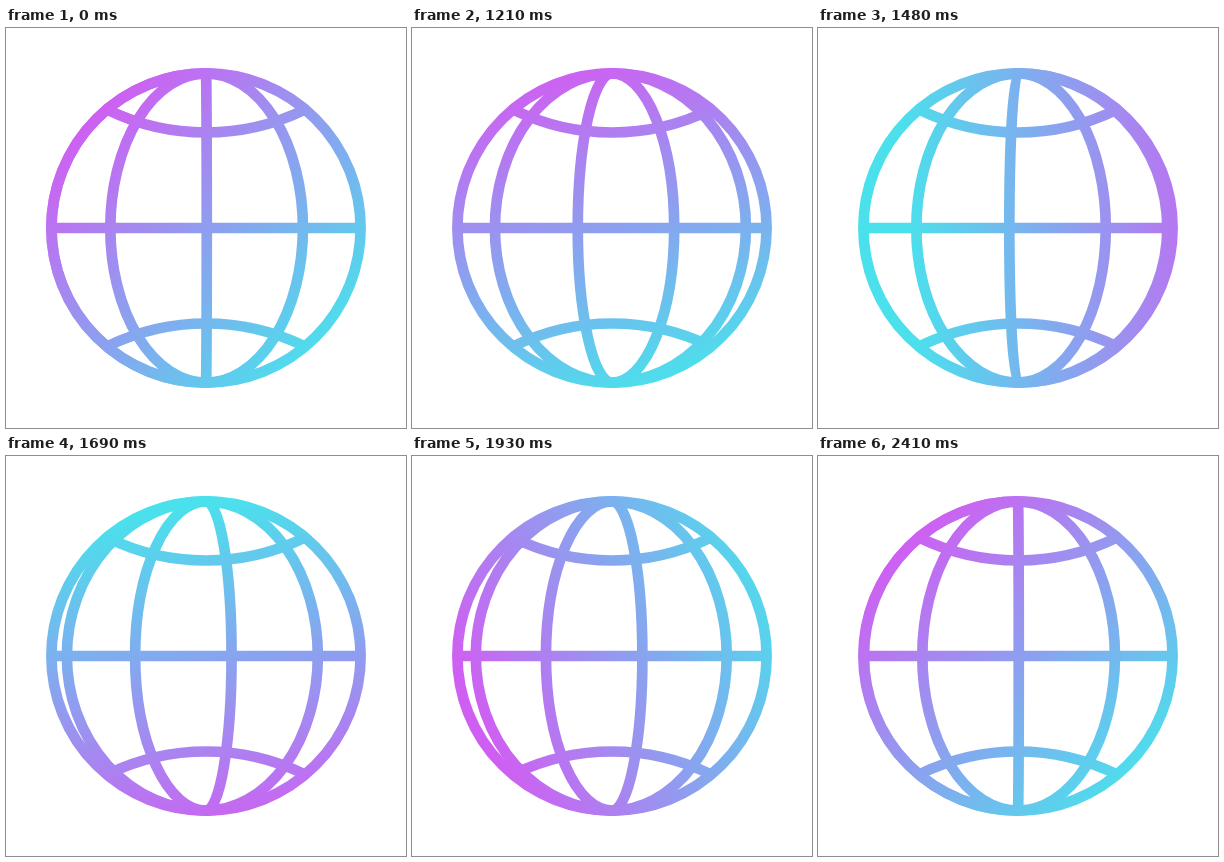
These frames come from a looping animation (400x400 px, 2.44 s). An HTML page:

```html
<!DOCTYPE html>
<html lang="en">
<head>
<meta charset="utf-8">
<title>Spinning globe</title>
<style>
  html, body { margin: 0; width: 100%; height: 100%; overflow: hidden; background: #fff; }
  svg { display: block; width: 100vw; height: 100vh; }
</style>
</head>
<body>
<svg viewBox="0 0 400 400">
  <defs>
    <linearGradient id="tint" gradientUnits="userSpaceOnUse">
      <stop offset="0" stop-color="#cf5ff2"/>
      <stop offset="1" stop-color="#4ae1ec"/>
    </linearGradient>
  </defs>
  <g fill="none" stroke="url(#tint)" stroke-width="10.7">
    <circle cx="200" cy="200" r="154.6"/>
    <path d="M45 200H355"/>
    <path d="M102 82A224.7 224.7 0 0 0 298 82"/>
    <path d="M102 318A224.7 224.7 0 0 1 298 318"/>
    <path id="meridians"/>
  </g>
</svg>
<script>
const LOOP = 2440, HOLD = 1030, STEP = 30;
const C = 200, R = 154.6, INNER = 96.5, SPAN = 335;

const times = [0, 180, 450, 660, 900, 1380];
const REST = { turn: 0.008, angle: 225, mid: 0.48 };
const spin = track([0.177, 0.645, 1.91, 3.265, 4.315, 5.008], 0.0018);
const tilt = track([227, 252, 356, 440, 516, 585], 0.07);
const shift = track([0.48, 0.5, 0.66, 0.55, 0.44, 0.48], 0);

const tint = document.getElementById('tint');
const meridians = document.getElementById('meridians');

// Smooth cubic curve through the key values, coming to rest at the end.
function track(vals, startSlope) {
  const last = vals.length - 1;
  const rate = i => (vals[i + 1] - vals[i]) / (times[i + 1] - times[i]);
  const slopes = vals.map((_, i) => {
    if (i === 0) return startSlope;
    if (i === last) return 0;
    const a = times[i] - times[i - 1], b = times[i + 1] - times[i];
    return (rate(i - 1) * b + rate(i) * a) / (a + b);
  });
  return t => {
    let i = 0;
    while (i < last - 1 && t >= times[i + 1]) i++;
    const h = times[i + 1] - times[i];
    const s = Math.min(1, (t - times[i]) / h), q = 1 - s;
    return vals[i] * (1 + 2 * s) * q * q + slopes[i] * h * s * q * q
      + vals[i + 1] * s * s * (3 - 2 * s) - slopes[i + 1] * h * s * s * q;
  };
}

// Equator position of a meridian: -2 and 2 are the rims, 0 is the centre.
function reach(u) {
  const a = Math.abs(u);
  return Math.sign(u) * (a < 1 ? a * INNER : INNER + (a - 1) * (R - INNER));
}

function arc(x) {
  return `M${C} ${C - R}A${Math.abs(x)} ${R} 0 0 ${x > 0 ? 1 : 0} ${C} ${C + R}`;
}

function draw(ms) {
  const t = Math.floor((ms % LOOP - HOLD) / STEP) * STEP;
  const moving = t >= 0;
  const turn = moving ? spin(t) : REST.turn;
  const angle = (moving ? tilt(t) : REST.angle) * Math.PI / 180;
  const mid = moving ? shift(t) : REST.mid;

  const phase = turn % 1;
  // The first meridian to appear leaves the rim a little late.
  const entry = moving ? phase * Math.min(1, t / 90) : 0;
  meridians.setAttribute('d',
    [entry - 2, phase - 1, phase, phase + 1].map(u => arc(reach(u))).join(''));

  const dx = Math.cos(angle) * SPAN, dy = Math.sin(angle) * SPAN;
  tint.setAttribute('x1', C + dx * mid);
  tint.setAttribute('y1', C + dy * mid);
  tint.setAttribute('x2', C - dx * (1 - mid));
  tint.setAttribute('y2', C - dy * (1 - mid));
}

const start = performance.now();
function tick() {
  draw(performance.now() - start);
  requestAnimationFrame(tick);
}
tick();
</script>
</body>
</html>
```
